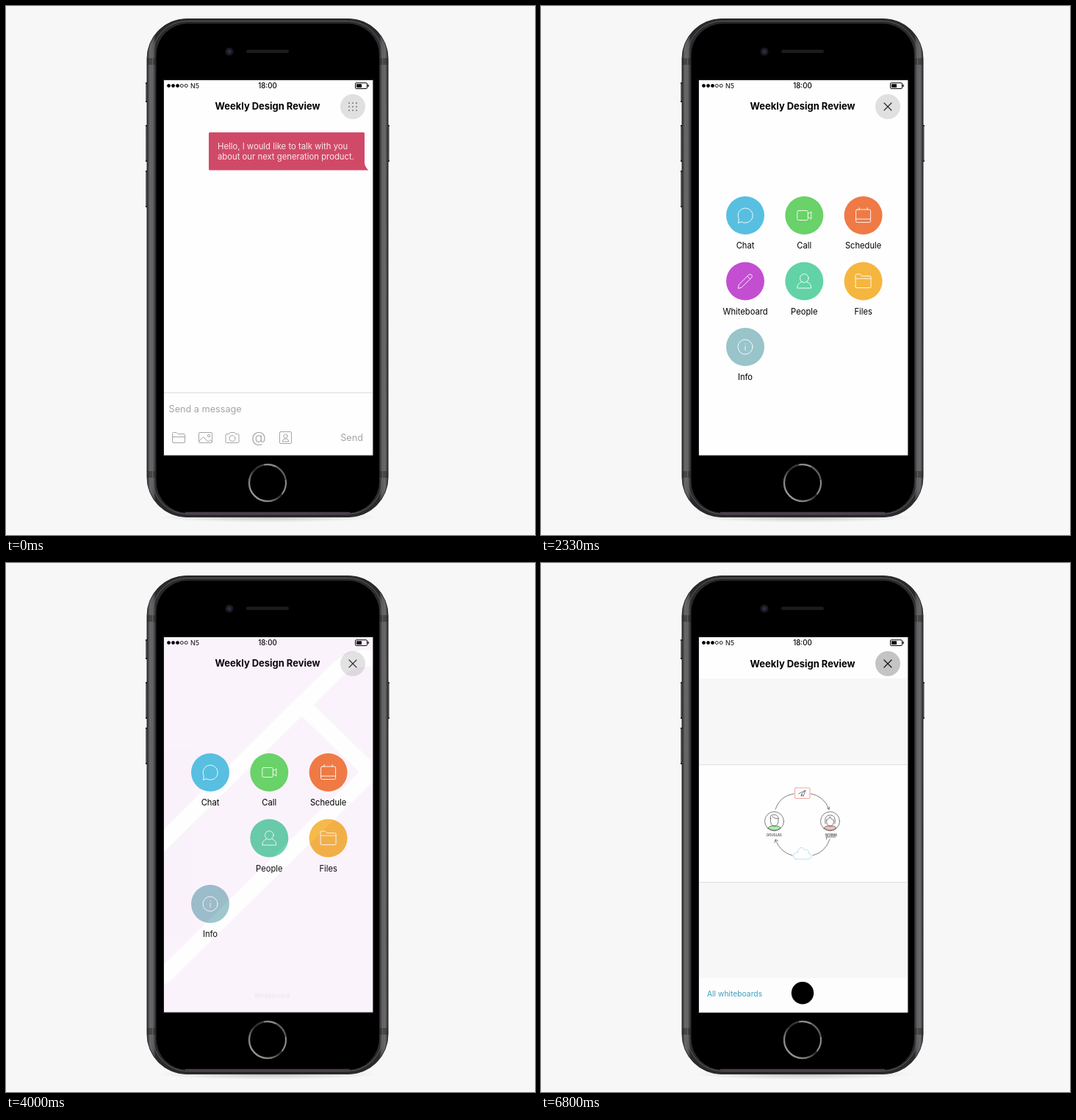
Write an HTML page that moves like this. It is 720x720 px and loops after 9.07 s.

```html
<!DOCTYPE html>
<html lang="en">
<head>
<meta charset="utf-8">
<title>Meeting app</title>
<style>
  html, body { margin: 0; width: 100%; height: 100%; overflow: hidden; background: #f7f7f7; }
  svg { display: block; width: 100%; height: 100%; font-family: Inter, sans-serif; }
  .line { fill: none; stroke-linecap: round; stroke-linejoin: round; }
  .title { font-size: 12.95px; font-weight: 700; text-anchor: middle; }
  .label { font-size: 11.2px; text-anchor: middle; }
  .link { font-size: 10.3px; fill: #3b9fbd; }
</style>
</head>
<body>
<svg viewBox="0 0 720 720" xmlns="http://www.w3.org/2000/svg">
  <defs>
    <clipPath id="screen"><rect x="215" y="101" width="283.500" height="510.500"/></clipPath>
    <linearGradient id="rim">
      <stop offset="0" stop-color="#2b2a2c"/><stop offset=".012" stop-color="#6b6a6c"/>
      <stop offset=".026" stop-color="#5a595b"/><stop offset=".036" stop-color="#2a292b"/>
      <stop offset=".964" stop-color="#2a292b"/><stop offset=".974" stop-color="#5a595b"/>
      <stop offset=".988" stop-color="#6b6a6c"/><stop offset="1" stop-color="#2b2a2c"/>
    </linearGradient>
    <linearGradient id="ring" x1="0" y1="1" x2="1" y2="0">
      <stop offset="0" stop-color="#b4b4b4"/><stop offset=".3" stop-color="#777"/>
      <stop offset=".5" stop-color="#2c2c2c"/><stop offset=".75" stop-color="#444"/>
      <stop offset="1" stop-color="#8a8a8a"/>
    </linearGradient>
    <radialGradient id="shade">
      <stop offset="0" stop-color="#000" stop-opacity=".2"/><stop offset="1" stop-color="#000" stop-opacity="0"/>
    </radialGradient>

    <g id="sketch" class="line" stroke="#555" stroke-width=".75">
      <path d="M319 335Q325 317 344 314M367 314Q385 317 392 335M393 376Q387 394 370 398M342 398Q326 394 319 377"/>
      <path d="M389.500 333.500L392 335.500L392.500 332M318 380.500L319 376.500L322.500 378"/>
      <rect x="345.500" y="306" width="20.500" height="14.500" rx="1.500" stroke="#ee8680"/>
      <path d="M350.500 314L360 309.500L357 317.500L354.500 314.500L360 309.500M354.500 314.500L354 317.500L356 316"/>
      <path stroke="#9cd8ea" d="M347 403H364C369 403 370 396 364.500 395.500C365 390 360 389 359 391C357 385 349 387 349.500 394C343 393.500 341 402 347 403Z"/>
      <path fill="#a9efa9" d="M309 361Q311 357 317.500 358Q324 357 326 361Q317.500 367 309 361Z"/>
      <circle cx="317.500" cy="351.500" r="13"/>
      <path d="M312.500 347Q311.500 358 317.500 358Q323.500 358 323 348Q317 348 314.500 345M312.500 348Q311 343 315 343Q322 341 323.500 348"/>
      <path fill="#f3bcbc" d="M385 361Q387 357 393.500 358Q400 357 402 361Q393.500 367 385 361Z"/>
      <circle cx="393.500" cy="351.500" r="13"/>
      <path d="M388.500 350Q388.500 358 393.500 358Q398.500 358 398.500 350Q394 349 393.500 345Q392 349 388.500 350M387 355Q385 343 393.500 343Q402 343 400 355"/>
      <path d="M388 373H401M388.500 376L389 373"/>
      <g fill="#333" stroke="none" font-size="4.200" text-anchor="middle" font-weight="500">
        <text x="317.500" y="371.700">DOUGLAS</text><text x="395" y="371.700">NORMA</text>
      </g>
    </g>
  </defs>

  <rect width="720" height="720" fill="#f7f7f7"/>
  <ellipse cx="356" cy="696" rx="150" ry="7" fill="url(#shade)"/>
  <g id="keys"></g>
  <rect x="192" y="17.500" width="328" height="678" rx="54" fill="url(#rim)" stroke="#29282a"/>
  <path d="M192 71h12v9h-12zM508 71h12v9h-12zM192 633h12v9h-12zM508 633h12v9h-12z" fill="#222" opacity=".45"/>
  <rect x="199.500" y="20.500" width="313" height="671" rx="47" fill="none" stroke="#6a686b" stroke-width=".8"/>
  <rect x="204.500" y="24" width="303.500" height="666" rx="43" fill="#000"/>
  <path d="M244 689.500H468" stroke="#5a4358" stroke-width="1.300"/>
  <circle cx="304" cy="62" r="5.500" fill="#19181d"/>
  <circle cx="304" cy="62" r="2.600" fill="#2c2c48"/>
  <rect x="327" y="59.500" width="58" height="4.500" rx="2.200" fill="#1d1b1e"/>
  <circle cx="356" cy="649" r="25" fill="#000" stroke="url(#ring)" stroke-width="2.400"/>
  <path class="line" d="M352 624.300A25 25 0 0 1 367 626.600M380.800 646A25 25 0 0 1 376 664" stroke="#8f8f8f" stroke-width="1.800"/>
  <rect x="213.500" y="99.500" width="287" height="513.500" fill="#19131a"/>
  <rect x="215" y="101" width="284.300" height="510.500" fill="#fefefe"/>

  <g clip-path="url(#screen)">
    <g id="status">
      <g stroke="#000" stroke-width=".9">
        <circle cx="221.500" cy="108.500" r="2"/><circle cx="227.500" cy="108.500" r="2"/>
        <circle cx="233.500" cy="108.500" r="2"/>
        <circle cx="239.300" cy="108.500" r="2" fill="none"/><circle cx="245.200" cy="108.500" r="2" fill="none"/>
      </g>
      <text x="251" y="111.700" font-size="8.800">N5</text>
      <text x="356" y="111.800" font-size="9.700" font-weight="500" text-anchor="middle">18:00</text>
      <rect x="475.500" y="104.700" width="16" height="7.800" rx="1.300" fill="none" stroke="#000"/>
      <path d="M477 106.200h7v4.800h-7zM492.500 107h1.300v3h-1.300z"/>
    </g>
    <text class="title" x="356" y="141">Weekly Design Review</text>
    <circle cx="472" cy="137" r="17" fill="#e0e0e0"/>
    <g id="dots" fill="#444"></g>
    <path id="cross" class="line" stroke="#222" stroke-width="1.100"/>

    <g id="chat">
      <path d="M277.500 172H486.500Q488 172 488 173.500V214Q489 220 493.500 223.500H277.500Q276 223.500 276 222V173.500Q276 172 277.500 172Z" fill="#d04a68"/>
      <g font-size="11.300" fill="#fbe6ea">
        <text x="288" y="195">Hello, I would like to talk with you</text>
        <text x="288" y="208.700">about our next generation product.</text>
      </g>
      <path d="M215 526.500H499" stroke="#dcdcdc"/>
      <g fill="#a5a5a5" font-size="12.700">
        <text x="221.500" y="552.500">Send a message</text>
        <text x="486" y="592" text-anchor="end">Send</text>
        <text x="344" y="593.500" font-size="20.500" font-weight="300" text-anchor="middle">@</text>
      </g>
      <g class="line" stroke="#a5a5a5">
        <path d="M226.500 593V581.500Q226.500 580.500 227.500 580.500H232L234 582.500H242.500Q243.500 582.500 243.500 583.500V593Q243.500 594.500 242 594.500H228Q226.500 594.500 226.500 593ZM226.500 586.500H243.500"/>
        <rect x="262.500" y="580.500" width="18" height="14" rx="1.500"/>
        <path d="M263 592L268.500 586.500L275 593L277.500 590.500L280.500 593"/><circle cx="276" cy="585" r="1.700"/>
        <path d="M300.500 582.500H303.500L305 580.500H311L312.500 582.500H315.500Q317 582.500 317 584V593Q317 594.500 315.500 594.500H300.500Q299 594.500 299 593V584Q299 582.500 300.500 582.500Z"/>
        <circle cx="308" cy="588.500" r="4"/>
        <rect x="372.500" y="579.500" width="16" height="16" rx="1.500"/>
        <circle cx="380.500" cy="585.500" r="2.700"/><path d="M376 592.500Q376.500 589 380.500 589Q384.500 589 385 592.500Z"/>
      </g>
    </g>

    <g id="menu"></g>

    <g id="page">
      <rect x="215" y="117" width="284" height="495" fill="#fefefe"/>
      <text class="title" x="356" y="142">Weekly Design Review</text>
      <circle cx="472" cy="137" r="17" fill="#c4c4c4"/>
      <path class="line" d="M467 132l10 10m0-10l-10 10" stroke="#111" stroke-width="1.200"/>
      <path d="M215 158.500H499" stroke="#e6e6e6"/>
      <rect x="241" y="187" width="230" height="129" fill="none" stroke="#a0a0a0"/>
      <use href="#sketch" transform="translate(356 251) scale(.82) translate(-355.500 -354)"/>
      <rect x="215" y="566" width="284" height="40" fill="#f7f7f7"/>
      <path d="M215 566.500H499" stroke="#e6e6e6"/>
      <text class="link" x="226" y="590.500">New</text>
      <text class="link" x="485.500" y="590.500" text-anchor="end">Select</text>
      <circle id="tap" cx="361" cy="242" r="10"/>
    </g>

    <g id="detail">
      <rect x="215" y="157" width="284" height="408" fill="#f7f7f7"/>
      <rect x="214" y="274.500" width="286" height="160" fill="#fefefe" stroke="#e0e0e0"/>
      <rect x="215" y="565" width="284" height="47" fill="#fdfdfd"/>
      <text class="link" x="226" y="589.700">All whiteboards</text>
      <circle cx="356" cy="585.300" r="15.200"/>
    </g>
    <use id="drawing" href="#sketch"/>
  </g>
</svg>

<script>
const LOOP = 9070, STEP = 1000 / 15;
const $ = id => document.getElementById(id);

const menu = [
  ['Chat', '#58bfe1', '<path d="M-9.500 10L-8.700 4.800A10 10 0 1 1 -4.700 8.900Z"/>'],
  ['Call', '#69d268', '<rect x="-9.500" y="-6.500" width="14.500" height="13" rx="1.800"/><path d="M5-2L9.500-5V5L5 2"/>'],
  ['Schedule', '#ef7a45', '<rect x="-10" y="-8" width="20" height="17.500" rx="1.800"/><path d="M-10 5H10M-5.500-10.500V-8M5.500-10.500V-8"/>'],
  ['Whiteboard', '#c44ed1', '<path d="M-9.600 9.500L-8.600 4.600L4.900-8.700A2.700 2.700 0 0 1 8.700-4.900L-4.800 8.400ZM2.900-6.700L6.800-2.900"/>'],
  ['People', '#62d3a6', '<circle cy="-4" r="5.800"/><path d="M-3.500 1Q-9.500 3-9.500 9.500H9.500Q9.500 3 3.500 1"/>'],
  ['Files', '#f5b63f', '<path d="M-10.500 7.500V-8Q-10.500-9.500-9-9.500H-4L-2-7H9Q10.500-7 10.500-5.500V7.500Q10.500 9 9 9H-9Q-10.500 9-10.500 7.500ZM-10.500-3.500H10.500"/>'],
  ['Info', '#98c4ca', '<circle r="10"/><path d="M0-1V4.500M0-4.300V-4"/>']
].map(([name, color, icon], i) => ({
  name, color, icon, i, x: 278 + i % 3 * 80.3, y: 285 + Math.floor(i / 3) * 89.5
}));

// Earlier entries lie on top of later ones.
$('menu').innerHTML = [...menu].reverse().map(m => `<g id="item${m.i}">
  <text id="label${m.i}" class="label" y="45">${m.name}</text>
  <g id="disc${m.i}"><circle r="26" fill="${m.color}"/>
  <g class="line" stroke="#fff" stroke-width=".9">${m.icon}</g></g></g>`).join('');

$('dots').innerHTML = Array.from({ length: 9 }, (_, i) =>
  `<circle cx="${467 + i % 3 * 5}" cy="${132 + Math.floor(i / 3) * 5}" r=".85"/>`).join('');

// Side keys: a thin bar with dark ends.
$('keys').innerHTML = [[190, 104, 27], [190, 162, 50], [190, 224, 50], [519.5, 162, 50]].map(([x, y, h]) =>
  `<rect x="${x}" y="${y}" width="2.200" height="${h}" fill="#6e6d70"/>
  <path d="M${x} ${y}h2.200v2h-2.200zM${x} ${y + h - 2}h2.200v2h-2.200z" fill="#1e1d1f"/>`).join('');

const ramp = (t, start, length) => Math.min(1, Math.max(0, (t - start) / length));
const outQuad = x => 1 - (1 - x) ** 2;
const inOutCubic = x => x < .5 ? 4 * x ** 3 : 1 - 4 * (1 - x) ** 3;
const outBack = x => 1 + 2.70158 * (x - 1) ** 3 + 1.70158 * (x - 1) ** 2;
const set = (id, name, value) => $(id).setAttribute(name, value);
const fade = (id, value) => set(id, 'opacity', value);

function render(t) {
  fade('chat', 1 - outQuad(ramp(t, 480, 920)));

  const open = outQuad(ramp(t, 480, 450)), arm = 5 * open;
  fade('dots', 1 - open);
  fade('cross', open);
  set('cross', 'd', `M${472 - arm} ${137 - arm}L${472 + arm} ${137 + arm}M${472 + arm} ${137 - arm}L${472 - arm} ${137 + arm}`);

  for (const { i, x, y } of menu) {
    const s = Math.max(0, outBack(ramp(t, 1430 + i * 68, 480)));
    set('item' + i, 'transform', `translate(${x} ${y + 10}) scale(${s}) translate(0 -10)`);
  }

  // The whiteboard disc swells past the screen while its label drifts down.
  const p = inOutCubic(ramp(t, 3301, 935));
  set('disc3', 'transform', `translate(${58 * p} ${-19 * p}) scale(${1 + 25 * p})`);
  set('label3', 'transform', `translate(${90 * p} ${185 * p + 41}) scale(${1 - .22 * p}) translate(0 -41)`);
  fade('disc3', 1 - p);
  fade('label3', 1 - p);

  fade('page', ramp(t, 4133, 400));
  fade('tap', t > 4725 && t < 4860 ? .25 : 0);
  fade('detail', ramp(t, 5133, 600));
  fade('drawing', ramp(t, 5933, 860));
}

const begin = performance.now();
function tick() {
  const now = (performance.now() - begin) % LOOP;
  render(Math.floor((now + 4) / STEP) * STEP);
  requestAnimationFrame(tick);
}
tick();
</script>
</body>
</html>
```
